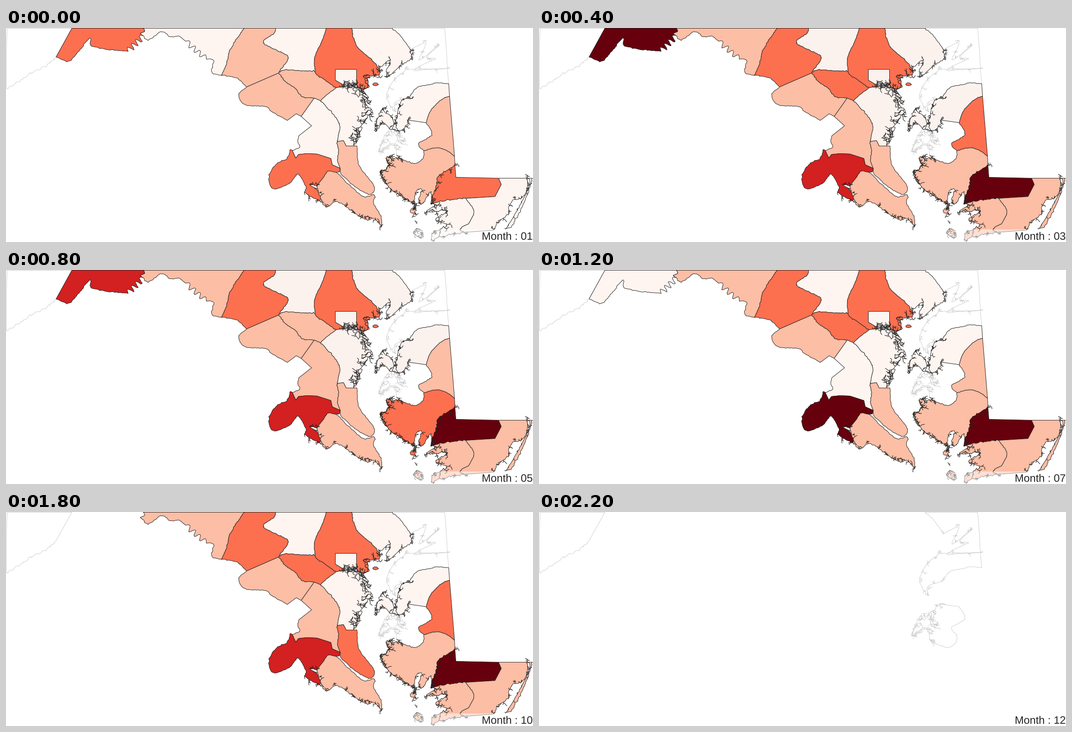
Recreate the animation shown at these times as a matplotlib script. Size 1172 by 478 pixels, loop 2.4 s.

```python
import numpy as np
import matplotlib.pyplot as plt
from matplotlib.animation import FuncAnimation
from matplotlib.collections import LineCollection
from matplotlib.patches import Polygon, Rectangle

plt.rcParams["text.hinting"] = "none"

W, H, DPI = 1172, 478, 64
PX = 72 / DPI
INK, GREY = "#222222", "#c4c4c4"
FILLS = ["#fef4f0", "#fcbea5", "#fc7050", "#d32020", "#67000d"]
DIM_PALE = "#fbf1ed"
DIM_MONTHS = (3, 4, 5, 9)


def line(*xy):
    return np.maximum(np.array(xy, float).reshape(-1, 2) - 0.5, 0.5)


def edge(*xy, rough=0.6):
    """Smooth curve through a few key points, with a seeded wobble."""
    key = line(*xy)
    rng = np.random.default_rng(int(key.sum()))
    p = np.pad(key, ((1, 1), (0, 0)), mode="edge")
    out = [key[:1]]
    for a, b, c, d in zip(p, p[1:], p[2:], p[3:]):
        n = max(2, int(np.hypot(*(c - b)) / 3))
        t = np.arange(1, n + 1)[:, None] / n
        out.append(b + 0.5 * t * (c - a + t * (2 * a - 5 * b + 4 * c - d
                                              + t * (3 * b - a - 3 * c + d))))
    out = np.vstack(out)
    out[1:-1] += rng.normal(0, rough, (len(out) - 2, 2))
    return out


def comb(x0, y0, x1, y1, teeth, depth):
    """Meandering bank: a zigzag about a straight line."""
    a, b = line(x0, y0, x1, y1)
    t = np.linspace(0, 1, 2 * teeth + 1)[:, None]
    side = np.sin(np.pi * (np.arange(len(t)) + 0.5))[:, None]
    side[[0, -1]] = 0
    u = (b - a) / np.hypot(*(b - a))
    pts = a + (b - a) * t + side * depth * np.array([-u[1], u[0]])
    return edge(*(pts + 0.5).ravel(), rough=0.4)


def ring(*parts):
    return np.vstack(parts)


def blob(x, y, rx, ry, n=14):
    """Small ragged island."""
    rng = np.random.default_rng(int(x + y))
    a = np.linspace(0, 2 * np.pi, n)
    r = rng.uniform(0.6, 1.1, n)
    return np.column_stack([x + rx * r * np.cos(a), y + ry * r * np.sin(a)])


def creek(x, y, ang, step, depth, rng, out):
    pts = [(x, y)]
    for _ in range(4):
        ang += rng.normal(0, 0.6)
        x, y = x + step * np.cos(ang), y + step * np.sin(ang)
        pts.append((x, y))
        if depth and rng.random() < 0.6:
            turn = rng.choice([-1.1, 1.1])
            creek(x, y, ang + turn, step * 0.7, depth - 1, rng, out)
    out.append(pts)


def creeks(shore, n, step, heading, depth=1):
    """Branching inlets spread along a shore."""
    rng = np.random.default_rng(n + int(shore.sum()))
    out = []
    for i in np.linspace(0, len(shore) - 1, n).astype(int):
        ang = np.radians(heading) + rng.normal(0, 0.4)
        creek(*shore[i], ang, step, depth, rng, out)
    return out


# Borders shared by neighbours
alle_south = ring(edge(112, 65, 139, 75, 155, 61, 187, 23, 189, 39, 217, 47, 272, 53),
                  comb(272, 53, 306, 18, 4, 7))
alle_east = edge(306, 18, 299, 13, 309, 8, 306, 0)
wash_south = ring(edge(306, 18, 317, 27, 347, 9, 366, 20, 385, 19, 400, 30),
                  comb(400, 30, 446, 70, 4, 6),
                  edge(446, 70, 462, 73, 458, 100, 479, 106))
wash_fred = edge(479, 106, 490, 85, 497, 55, 511, 28, 531, 0)
fred_south = edge(479, 106, 512, 112, 536, 132)
fred_mont = line(536, 132, 607, 101)
fred_carr = edge(607, 101, 628, 68, 616, 57, 573, 33, 598, 11, 600, 0)
carr_how = edge(607, 101, 621, 94, 655, 96, 688, 97)
carr_balt = edge(688, 97, 687, 66, 704, 28, 713, 0, rough=0.3)
how_balt = edge(688, 97, 693, 106, 712, 118, 735, 134)
how_arun = edge(735, 134, 711, 153, 700, 163)
how_mont = edge(607, 101, 622, 121, 642, 134, 660, 154, 686, 157)
how_geo = line(686, 157, 700, 163)
mont_geo = line(686, 157, 657, 198)
mont_river = edge(626, 207, 591, 187, 578, 176, 532, 172, 518, 150, 536, 132, rough=0.4)
geo_arun = edge(700, 163, 713, 176, 735, 202, 743, 222, 737, 254)
geo_calv = edge(737, 254, 740, 275, 738, 295, 744, 314)
geo_char = line(637, 274, 645, 291, 651, 283, 670, 281, 692, 282, 723, 292,
                726, 306, 744, 314)
char_mary = edge(716, 320, 702, 340, 691, 353, rough=0.3)
city = line(755, 130, 733, 117, 733, 93, 780, 93, 780, 126)
balt_harf = edge(770, 0, 780, 40, 815, 72, 830, 92)
harf_cec = edge(859, 0, 878, 18, 900, 49)
queen_kent = edge(897, 156, 915, 133, 940, 128, 960, 123, 985, 125)
queen_caro = edge(987, 153, 970, 160, 945, 185, 935, 212, rough=0.3)
queen_talb = line(935, 212, 893, 206)
caro_talb = edge(935, 212, 947, 239, 918, 259, 930, 275)
caro_dor = edge(930, 275, 957, 268, 980, 274, 998, 287, rough=0.3)
dor_talb = edge(930, 275, 928, 290, 910, 303, 873, 291)
dor_wic = edge(999, 308, 964, 330, 958, 355, 947, 381, rough=1)
wic_south = edge(1023, 381, 1000, 383, 970, 387, 945, 394)
wic_worc = line(1096, 336, 1102, 350, 1088, 377, 1023, 381)
som_worc = edge(1023, 381, 1041, 410, 1030, 435, 1010, 450, 1020, 457)

# Shores of the bay and its rivers
harbor = edge(780, 126, 770, 122, 764, 124, 755, 130, rough=1)
balt_shore = edge(830, 92, 831, 104, 806, 111, 808, 130, 791, 137, 780, 126, rough=1.4)
harf_shore = edge(900, 49, 902, 70, 875, 88, 846, 110, 855, 72, 830, 92, rough=1.4)
arun_shore = edge(755, 130, 778, 134, 806, 154, 797, 170, 814, 186, 798, 206,
                  788, 234, 774, 264, rough=1.5)
calv_shore = edge(781, 264, 786, 308, 819, 354, 809, 372, 777, 355, 745, 326, 744, 314)
char_river = edge(691, 353, 675, 350, 692, 362, 698, 387, 664, 367, rough=1)
char_shore = edge(664, 367, 667, 354, 650, 327, 632, 346, 596, 360, 585, 335,
                  600, 306, 626, 291, 632, 273, 637, 274)
mary_north = edge(716, 320, 738, 325, 768, 355, 797, 377, 820, 374, 818, 392, 834, 420,
                  836, 444)
mary_tip = edge(836, 444, 818, 426, 804, 430, 775, 414)
mary_west = edge(775, 414, 737, 388, 710, 399, 691, 353)
queen_shore = edge(893, 206, 891, 221, 868, 224, 877, 168, 897, 156, rough=1.2)
kent_isle = edge(838, 181, 826, 205, 822, 232, 838, 214, 858, 227, 862, 203, 844, 191,
                 838, 181, rough=1)
dor_south = edge(947, 381, 945, 366, 928, 392, 918, 388, 924, 360, 911, 368, 908, 394,
                 rough=1)
dor_west = edge(908, 394, 874, 373, 847, 350, 832, 322, rough=1.2)
dor_north = edge(832, 322, 852, 308, 846, 291, 873, 291, rough=1.4)
som_shore = edge(945, 394, 958, 396, 935, 410, 980, 409, 955, 429, 982, 441, 951, 455,
                 rough=1.4)
som_south = edge(951, 455, 947, 474, 965, 467, 1020, 457, rough=1.2)
worc_bay = edge(1160, 336, 1154, 372, 1124, 390, 1118, 415, 1095, 433, 1085, 452,
                rough=1.4)
ocean = edge(1171, 336, 1156, 384, 1124, 446)
barrier = edge(1113, 448, 1147, 391, 1166, 346, 1160, 336)
smith_isle = blob(917, 457, 10, 9)
garr_river = edge(111, 66, 85, 88, 63, 97, 38, 114, 3, 137, rough=1)
cec_shore = edge(982, 91, 945, 93, 908, 94, 955, 69, 935, 67, 964, 38, 920, 72, 934, 34,
                 900, 49)
kent_shore = edge(891, 93, 864, 116, 847, 152, 866, 188, 866, 166, 897, 156)
talb_shore = edge(873, 291, 860, 260, 830, 277, 853, 230, 880, 258, 872, 230, 893, 206,
                  rough=1.2)

# Each county: one shade digit per month, then its rings
COUNTIES = [
    ("2344300", ring(line(147, 0, 112, 65), alle_south, alle_east)),
    ("0" + "1" * 10, ring(wash_south, wash_fred, alle_east[::-1])),
    ("1" + "2" * 9 + "1", ring(fred_south, fred_mont, fred_carr, wash_fred[::-1])),
    ("00000000100", ring(carr_how, carr_balt, fred_carr[::-1])),
    ("11221122222", ring(carr_how, how_balt, how_arun, how_geo[::-1], how_mont[::-1])),
    ("1" * 11, ring(fred_mont, how_mont, mont_geo, line(646, 192, 626, 207),
                    mont_river)),
    ("01111100110", ring(how_geo, geo_arun, geo_calv, geo_char[::-1],
                         edge(637, 274, 654, 266, 649, 254, 652, 241),
                         line(680, 219), mont_geo[::-1])),
    ("2" * 11, ring(balt_harf, balt_shore, city[::-1], line(735, 134),
                    how_balt[::-1], carr_balt), blob(822, 126, 7, 4)),
    ("0" * 11, ring(city, harbor)),
    ("0" * 11, ring(geo_arun[::-1], how_arun[::-1], arun_shore,
                    line(757, 264, 751, 252, 737, 254))),
    ("0" * 11, ring(harf_cec, harf_shore, balt_harf[::-1])),
    ("23333344333", ring(geo_char, line(742, 322, 733, 323), char_mary, char_river,
                         char_shore)),
    ("1" * 8 + "221", ring(line(737, 254, 751, 252, 757, 264), calv_shore,
                           geo_calv[::-1])),
    ("1" * 10 + "0", ring(mary_north, mary_tip, mary_west, char_mary[::-1])),
    ("0" * 11, ring(queen_kent, queen_caro, queen_talb, queen_shore), kent_isle),
    ("11221112222", ring(queen_caro[::-1], line(998, 287), caro_dor[::-1],
                         caro_talb[::-1])),
    ("11112211110", ring(caro_dor, dor_wic, dor_south, dor_west, dor_north,
                         dor_talb[::-1]), blob(905, 408, 8, 6)),
    ("23" + "4" * 9, ring(line(999, 308, 1001, 334, 1096, 336), wic_worc, wic_south,
                          dor_wic[::-1])),
    ("0" + "1" * 10, ring(wic_south, som_shore, som_south, som_worc[::-1]),
     smith_isle),
    ("0" + "1" * 10, ring(wic_worc[::-1], worc_bay, som_worc[::-1]),
     ring(ocean, barrier)),
]

NO_DATA = [
    ring(line(3, 0, 147, 0), garr_river, line(1, 134, 1, 60, 3, 0)),
    ring(harf_cec[::-1], line(976, 0, 980, 50), cec_shore),
    ring(line(982, 91), kent_shore, queen_kent),
    ring(queen_talb[::-1], caro_talb, dor_talb, talb_shore),
]

GREY_CREEKS = (creeks(talb_shore, 36, 2.4, 10) + creeks(kent_shore, 10, 2, -30)
               + creeks(cec_shore, 12, 1.6, -60))

INK_CREEKS = (
    creeks(arun_shore, 26, 3.6, 185) + creeks(harbor, 6, 2.4, 120)
    + creeks(balt_shore, 14, 2.4, 190) + creeks(harf_shore, 12, 1.8, -60)
    + creeks(kent_isle, 16, 1.9, -60) + creeks(queen_shore, 14, 1.9, -20)
    + creeks(dor_north, 14, 2.6, 10) + creeks(dor_west, 16, 2, 20)
    + creeks(dor_south, 6, 1.8, -60) + creeks(dor_wic, 6, 2, 10)
    + creeks(som_shore, 16, 2.4, 5) + creeks(som_south, 5, 1.8, 10)
    + creeks(line(905, 402, 908, 415, 910, 430), 6, 2, 60)
    + creeks(smith_isle, 9, 2, 90) + creeks(mary_tip, 8, 2, -70)
    + creeks(mary_west, 6, 1.8, -60) + creeks(char_river, 8, 1.7, 20)
    + creeks(worc_bay, 10, 1.8, -20) + creeks(barrier, 8, 1.3, 115, depth=0))

fig = plt.figure(figsize=(W / DPI, H / DPI), dpi=DPI, facecolor="white")
ax = fig.add_axes([0, 0, 1, 1])
ax.set(xlim=(0, W), ylim=(H, 0))
ax.axis("off")

for pts in NO_DATA:
    ax.add_patch(Polygon(pts, fc="none", ec=GREY, lw=0.8 * PX, zorder=1))
ax.add_collection(LineCollection(GREY_CREEKS, colors=GREY, lw=0.8 * PX, zorder=1))

shapes = [(shades, [ax.add_patch(Polygon(r, ec=INK, lw=PX, zorder=2,
                                         joinstyle="round")) for r in rings])
          for shades, *rings in COUNTIES]
inlets = ax.add_collection(
    LineCollection(INK_CREEKS, colors=INK, lw=1.1 * PX, zorder=3))
ax.add_patch(Rectangle((900, 450), W - 900, H - 450, fc="white", alpha=0.52,
                       lw=0, zorder=4))
label = ax.text(1171, 473, "", ha="right", va="baseline", color="#262626",
                family="Liberation Sans", size=24 * PX, zorder=5)


def draw(i):
    month = i + 1
    pale = DIM_PALE if month in DIM_MONTHS else FILLS[0]
    fills = [pale] + FILLS[1:]
    for shades, patches in shapes:
        for p in patches:
            p.set_visible(i < len(shades))
            if i < len(shades):
                p.set_facecolor(fills[int(shades[i])])
    inlets.set_visible(month < 12)
    label.set_text(f"Month : {month:02d}")
    return []


anim = FuncAnimation(fig, draw, frames=12, interval=1000 / 5, repeat=True,
                     repeat_delay=0, blit=False)
plt.show()
```
